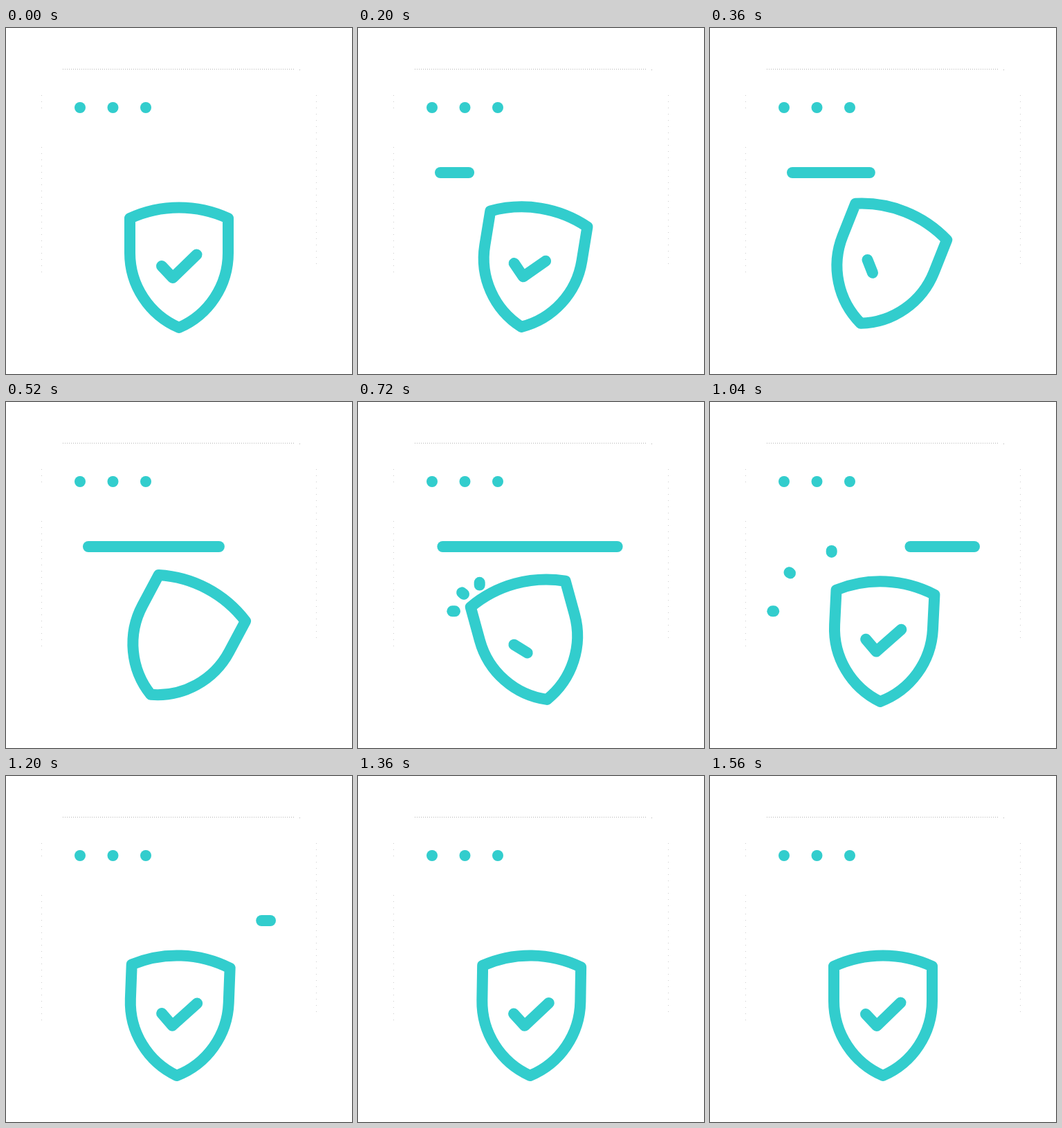
Animation, 500 px wide and 500 px high, one loop 2000 ms. Source, as an HTML page:

```html
<!DOCTYPE html>
<html lang="en">
<head>
<meta charset="utf-8">
<title>Shield</title>
<style>
html, body { margin: 0; width: 100%; height: 100%; overflow: hidden; background: #fff; }
svg { display: block; width: 100%; height: 100%; }
.lines { fill: none; stroke: #32cdcd; stroke-width: 16; stroke-linecap: round; stroke-linejoin: round; }
.frame { fill: none; stroke: #b4b4b4; stroke-width: 1; }
</style>
</head>
<body>
<svg viewBox="0 0 500 500">
  <g class="frame">
    <path stroke-dasharray="1 2" d="M82 59.5H417M424 60.5h1"/>
    <path stroke="#ccc" stroke-dasharray="1 8" d="M51.5 97V116M51.5 172V354M448.5 97V347"/>
  </g>
  <g fill="#32cdcd">
    <circle cx="107" cy="115" r="8"/>
    <circle cx="154.5" cy="115" r="8"/>
    <circle cx="202" cy="115" r="8"/>
  </g>
  <g class="lines">
    <path id="bar" pathLength="1" d="M119 209H382"/>
    <path class="spark" pathLength="1" d="M175.7 264.5V215"/>
    <path class="spark" pathLength="1" d="M153 277.7L114.5 246.2"/>
    <path class="spark" pathLength="1" d="M140 302.3H90.3"/>
    <g id="shield">
      <path d="M179 275A170 170 0 0 1 321 275V325A117.6 117.6 0 0 1 250 433A117.6 117.6 0 0 1 179 325Z"/>
      <path id="check" pathLength="1" d="M225 344L241 361L275.5 327.5"/>
    </g>
  </g>
</svg>
<script>
const LOOP = 2000, STEP = 40, END = 1560;
const bar = document.getElementById('bar');
const shield = document.getElementById('shield');
const check = document.getElementById('check');
const sparks = document.querySelectorAll('.spark');

// Eased progress from 0 to 1 between two times
function ease(t, from, to) {
  const p = Math.min(1, Math.max(0, (t - from) / (to - from)));
  return p * p * (3 - 2 * p);
}

// Show only the part of a path between two fractions of its length
function trim(path, start, end) {
  const length = end - start;
  path.style.display = length > 0.0005 ? '' : 'none';
  path.setAttribute('stroke-dasharray', `${length} 2`);
  path.setAttribute('stroke-dashoffset', -start);
}

function draw(t) {
  const angle = 28 * ease(t, 0, 520) - 44 * ease(t, 520, 680)
    + 18.8 * ease(t, 680, 1040) - 2.8 * ease(t, 1040, END);
  shield.setAttribute('transform', `rotate(${angle} 250 346)`);
  trim(check, 0, 1 - ease(t, 120, 490) + ease(t, 600, 920));
  trim(bar, ease(t, 680, 1280), ease(t, 0, 800));
  sparks.forEach(s => trim(s, ease(t, 740, 1080), ease(t, 680, 920)));
}

const begin = performance.now();
function tick() {
  const t = (performance.now() - begin) % LOOP;
  draw(Math.min(END, Math.floor(t / STEP) * STEP));
  requestAnimationFrame(tick);
}
tick();
</script>
</body>
</html>
```
